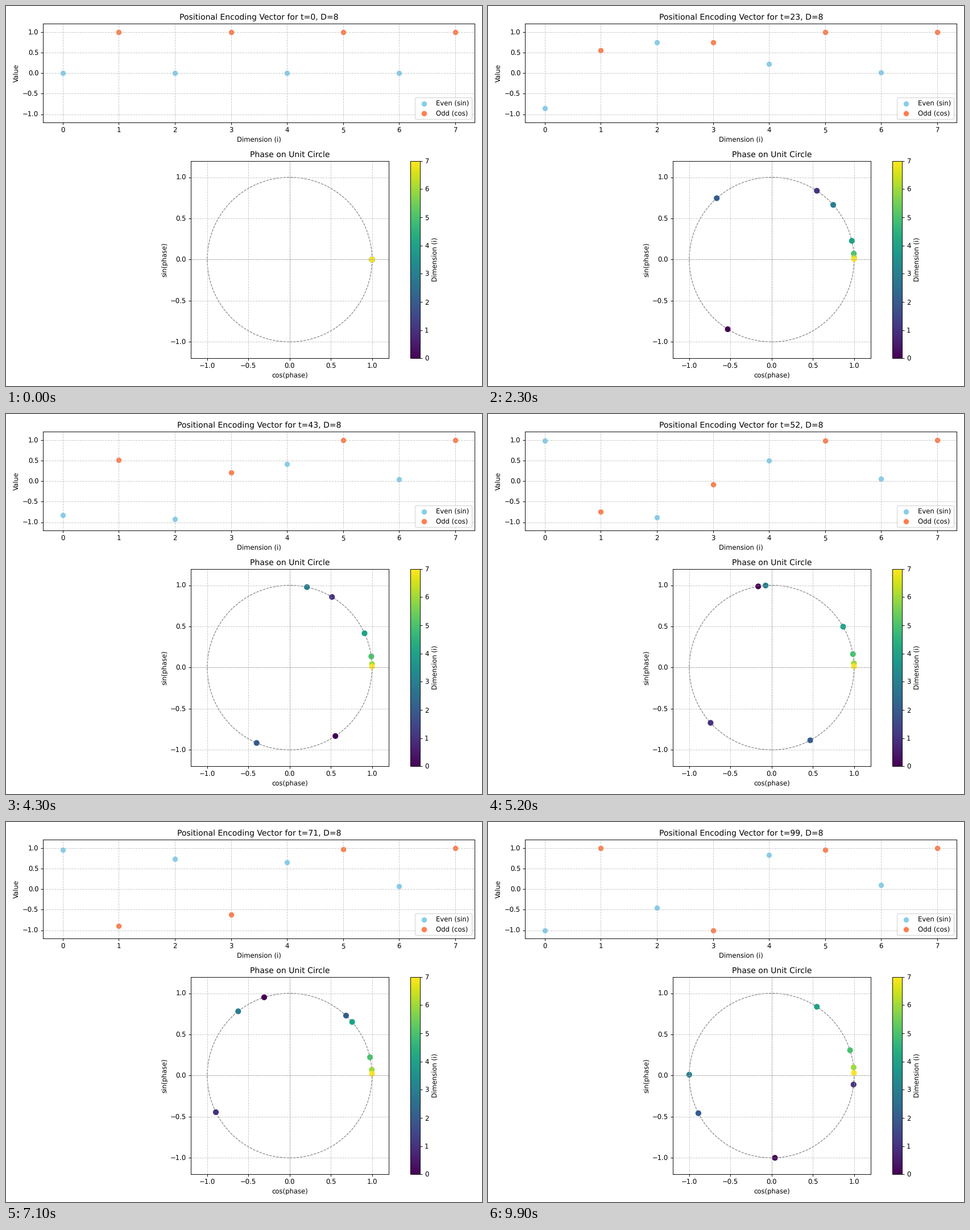
Recreate the animation shown at these times as a matplotlib script. Size 837 by 669 pixels, loop 10 s.

```python
import numpy as np
import matplotlib.pyplot as plt
from matplotlib.animation import FuncAnimation

W, H, DPI = 837, 669, 83.66
D, STEPS = 8, 100

plt.rcParams.update({"font.family": "DejaVu Sans",
                     "text.hinting": "no_hinting"})

dims = np.arange(D)
even, odd = dims[::2], dims[1::2]
freq = 10000.0 ** (-dims / D)
halves = np.arange(-1, 1.1, 0.5)


def label(ax, xlabel, ylabel):
    ax.set(xlabel=xlabel, ylabel=ylabel, ylim=(-1.2, 1.2), yticks=halves)
    ax.grid(True, linestyle="--", alpha=0.7)


# The tiny surplus keeps the pixel size from rounding down.
fig, (top, unit) = plt.subplots(
    2, 1, figsize=((W + 0.01) / DPI, (H + 0.01) / DPI), dpi=DPI,
    gridspec_kw={"height_ratios": [1, 2]})

# Encoding values per dimension
sin_dots = top.scatter(even, np.zeros(D // 2), s=50, color="skyblue",
                       label="Even (sin)")
cos_dots = top.scatter(odd, np.ones(D // 2), s=50, color="coral",
                       label="Odd (cos)")
label(top, "Dimension (i)", "Value")
top.set(xlim=(-0.35, 7.35), xticks=dims)
top.legend(loc="lower right")
title = top.set_title("")

# Phases on the unit circle
unit.add_patch(plt.Circle((0, 0), 1, fill=False, color="gray",
                          linestyle="--"))
unit.axhline(0, color="gray", linestyle=":", linewidth=0.8)
unit.axvline(0, color="gray", linestyle=":", linewidth=0.8)
phase_dots = unit.scatter(np.ones(D), np.zeros(D), s=60, c=dims,
                          cmap="viridis", vmin=0, vmax=D - 1)
label(unit, "cos(phase)", "sin(phase)")
unit.set(xlim=(-1.2, 1.2), xticks=halves, aspect="equal",
         title="Phase on Unit Circle")

fig.colorbar(phase_dots, ax=unit, label="Dimension (i)", ticks=dims)
fig.subplots_adjust(left=65.4 / W, right=824.45 / W, top=1 - 31.3 / H,
                    bottom=1 - 620.3 / H, hspace=0.2584)


def update(t):
    phase = t * freq
    sin, cos = np.sin(phase), np.cos(phase)
    sin_dots.set_offsets(np.column_stack([even, sin[::2]]))
    cos_dots.set_offsets(np.column_stack([odd, cos[1::2]]))
    phase_dots.set_offsets(np.column_stack([cos, sin]))
    title.set_text(f"Positional Encoding Vector for t={t}, D={D}")
    return sin_dots, cos_dots, phase_dots, title


anim = FuncAnimation(fig, update, frames=STEPS, interval=100,
                     repeat=True, repeat_delay=0, blit=False)
plt.show()
```
